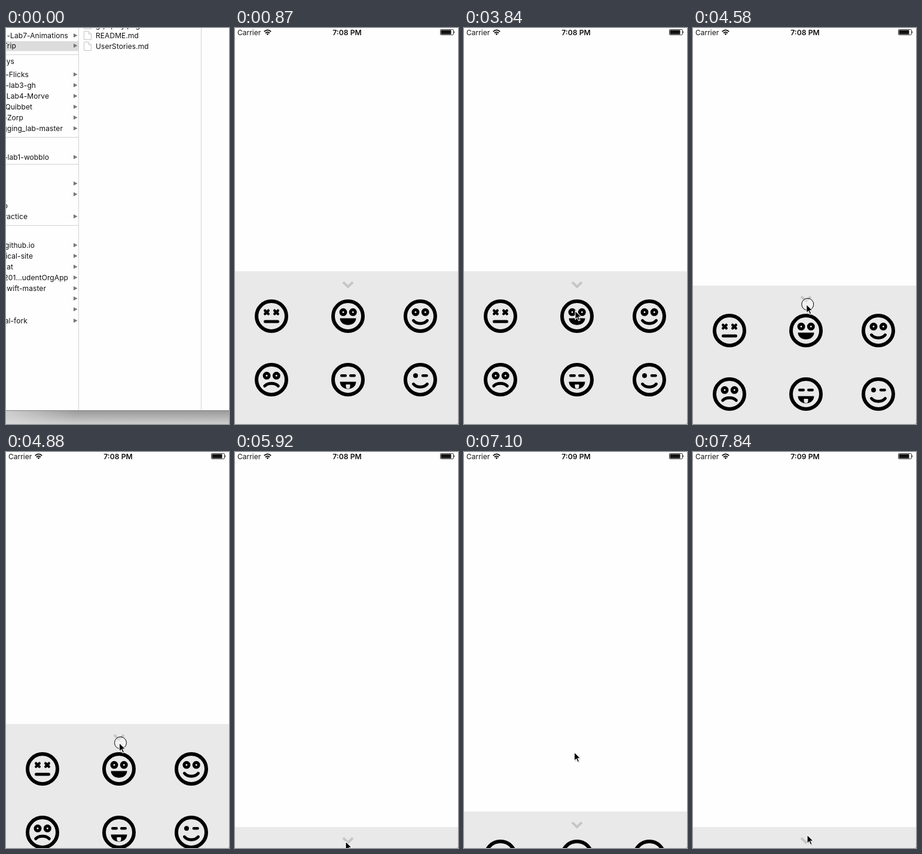
An HTML page for the animation above (7.99 s loop, 373x661 px).

```html
<!DOCTYPE html>
<html lang="en">
<head>
<meta charset="utf-8">
<title>Tray drag</title>
<style>
  html, body { margin: 0; width: 100%; height: 100%; overflow: hidden; background: #fefefe; }
  svg { display: block; width: 373px; height: 661px; font: 12px Inter, "Open Sans", sans-serif; fill: #111; }
  .line { stroke: #d2d2d2; fill: none; }
  .face { fill: none; stroke: #000; stroke-width: 5; stroke-linecap: round; }
  .face .solid { fill: #000; stroke: none; }
  .thin { stroke-width: 4.4; }
  #files { letter-spacing: .08px; }
</style>
</head>
<body>
<svg viewBox="0 0 373 661">
  <defs>
    <linearGradient id="shade" x2="0" y2="1">
      <stop stop-color="#989898"/><stop offset="1" stop-color="#cecece"/>
    </linearGradient>
    <linearGradient id="glow">
      <stop stop-color="#ddd" stop-opacity=".75"/><stop offset="1" stop-color="#ddd" stop-opacity="0"/>
    </linearGradient>
    <path id="arrow" d="M0 0V14.5L3.4 11.4L5.7 16.7L8.1 15.6L5.9 10.4H10.5Z"/>
    <path id="doc" d="M.5 .5H8L12.5 5V14.5H.5ZM8 .5V5H12.5" fill="#fff" stroke="#c4c4c4"/>
    <g id="eyes" class="solid"><circle cx="-8" cy="-6.7" r="4"/><circle cx="8.3" cy="-6.7" r="4"/></g>
    <path id="smile" d="M-11.5 7.3Q-7.5 12.3 0 12.3T11.5 7.3"/>
  </defs>

  <g id="files">
    <rect width="373" height="661" fill="#fefefe"/>
    <rect y="22" width="121" height="16.5" fill="#dcdcdc"/>
    <path class="line" d="M0 44.5H121M0 182.5H121M0 227.5H121M0 329.5H121M121.5 0V638M326.5 0V638"/>
    <g id="rows"></g>
    <use href="#doc" x="130" y="-13"/><use href="#doc" x="130" y="5"/><use href="#doc" x="130" y="23"/>
    <text x="150" y="-.5">grp-play.png</text>
    <text x="150" y="17.2">README.md</text>
    <text x="150" y="35.2">UserStories.md</text>
    <rect y="638" width="373" height="23" fill="url(#shade)"/>
    <rect y="639" width="115" height="22" fill="url(#glow)"/>
    <path d="M0 638.5H373" stroke="#858585"/>
  </g>

  <g id="phone">
    <rect width="373" height="661" fill="#fefefe"/>
    <text x="4" y="11.6">Carrier</text>
    <g fill="none" stroke="#000" stroke-width="1.8">
      <path d="M48.8 6.2Q54.5 .6 60.2 6.2M51 8.5Q54.5 5.2 58 8.5"/>
      <path d="M52.5 9.8L54.5 12L56.5 9.8Q54.5 8 52.5 9.8Z" fill="#000" stroke="none"/>
    </g>
    <text id="clock" x="187.5" y="11.6" text-anchor="middle" font-weight="600" font-size="12.2"></text>
    <rect x="343.5" y="2.5" width="22" height="9" rx="1.5" fill="none" stroke="#444"/>
    <rect x="344.5" y="3.5" width="17" height="7"/>
    <path d="M366.3 5Q368.5 7 366.3 9Z"/>

    <g id="tray">
      <rect width="373" height="260" fill="#e9e9e9"/>
      <path d="M181 18.3L189 26L197 18.3" fill="none" stroke="#c6c6c6" stroke-width="4"/>
      <g id="faces" class="face"></g>
    </g>
    <rect x="372" y="660" width="1" height="1" fill="#777"/>
    <g id="pointer">
      <circle id="press" cx="2" cy="0" r="10" fill="#fff" fill-opacity=".4" stroke="#000"/>
      <use href="#arrow" x=".8" y="1.4" opacity=".2"/>
      <use href="#arrow" fill="#000" stroke="#fff" stroke-width="1.1"/>
    </g>
  </g>
</svg>
<script>
const $ = id => document.getElementById(id);

// Folder list: right edge of the label, row centre, label, arrow
const rows = [
  [104, 13, '-Lab7-Animations', 1], [17, 30, 'Trip', 1], [14, 56, 'ays'],
  [38, 78, '-Flicks', 1], [50, 96, '-lab3-gh', 1], [72, 114, '-Lab4-Morve', 1],
  [44, 132, '-Quibbet', 1], [29, 150, '-Zorp', 1], [95, 168, 'gging_lab-master', 1],
  [72, 216, '-lab1-wobblo', 1], [0, 260, '', 1], [0, 278, '', 1], [3, 297, 'o'],
  [36, 315, 'ractice', 1], [48, 363, 'github.io', 1], [45, 381, 'ical-site', 1],
  [12, 399, 'at', 1], [104, 417, '201…udentOrgApp', 1], [67, 435, 'swift-master', 1],
  [0, 452, '', 1], [0, 470, '', 1], [36, 489, 'al-fork', 1]
];
$('rows').innerHTML = rows.map(([x, y, label, arrow]) =>
  `<text x="${x}" y="${y + 4.2}" text-anchor="end">${label}</text>` +
  (arrow ? `<path d="M113 ${y - 4}L119.5 ${y - .5}L113 ${y + 3}Z" fill="#777"/>` : '')
).join('');

const eyes = '<use href="#eyes"/>', smile = '<use href="#smile"/>';
const cross = x => `<path class="thin" d="M${x - 2.8} -9.3l5.6 5.6m0 -5.6l-5.6 5.6"/>`;
const faces = [
  cross(-8) + cross(8) + '<path d="M-10.5 9H10.5"/>',
  eyes + '<path class="solid" d="M-13.5 3.5H13.5C13 18.5 -13 18.5 -13.5 3.5Z"/>',
  eyes + smile,
  eyes + '<path d="M-11.3 10.5Q-7 6.3 0 6.3T11.3 10.5"/>',
  '<path class="thin" d="M-10.8 -6.7h6.6M4.2 -6.7h6.6"/>' +
  '<path class="solid" d="M-13.5 3.5H13.5C13 19.5 -13 19.5 -13.5 3.5Z"/>' +
  '<path d="M-3.5 8H3.5V11.5A3.5 3.5 0 0 1 -3.5 11.5Z" fill="#e9e9e9" stroke="none"/>',
  '<circle class="solid" cx="-8" cy="-6.7" r="4"/><path class="thin" d="M4 -6.7h6.6"/>' + smile
];
$('faces').innerHTML = faces.map((art, i) =>
  `<g transform="translate(${[61, 189, 310][i % 3]} ${i < 3 ? 75 : 181})">` +
  `<circle r="25" stroke-width="6"/>${art}</g>`
).join('');

const LOOP = 7990, OPEN = 870, TICK = 148.2;

// Keys: tick, then values; linear in between
const trayKeys = [[23, 406], [27, 454], [28, 505], [29, 505], [30, 600], [31, 626],
  [39, 626], [40, 536], [41, 518], [42, 600], [43, 626]];
const pointerKeys = [[10, 302, 612], [11, 302, 612], [14, 185, 475], [19, 185, 475],
  [20, 186, 472], [22, 190, 437], [23, 190, 437], [27, 189.5, 485.5], [28, 189, 536],
  [29, 189, 536], [31, 187, 630], [34, 185, 650], [35, 184.5, 648.5], [39, 184.5, 648.5],
  [40, 184.5, 528.5], [41, 184.5, 511], [42, 184.5, 501], [44, 184.5, 501], [47, 191, 639]];

function sample(keys, n) {
  const i = keys.findIndex(k => k[0] > n);
  if (i === 0) return keys[0].slice(1);
  if (i < 0) return keys[keys.length - 1].slice(1);
  const a = keys[i - 1], b = keys[i], p = (n - a[0]) / (b[0] - a[0]);
  return a.slice(1).map((v, j) => v + (b[j + 1] - v) * p);
}

const show = (id, on) => $(id).setAttribute('visibility', on ? 'inherit' : 'hidden');
const move = (id, x, y) => $(id).setAttribute('transform', `translate(${x} ${y})`);

function draw(now) {
  const t = now % LOOP, n = Math.floor((t - OPEN) / TICK);
  show('phone', t >= OPEN);
  show('pointer', t >= OPEN && n >= 10);
  show('press', t >= OPEN && ((n >= 23 && n < 30) || (n >= 38 && n < 42)));
  move('tray', 0, Math.round(sample(trayKeys, n)[0]));
  move('pointer', ...sample(pointerKeys, n));
  $('clock').textContent = n < 35 ? '7:08 PM' : '7:09 PM';
}

const start = performance.now();
(function loop() {
  draw(performance.now() - start);
  requestAnimationFrame(loop);
})();
</script>
</body>
</html>
```
